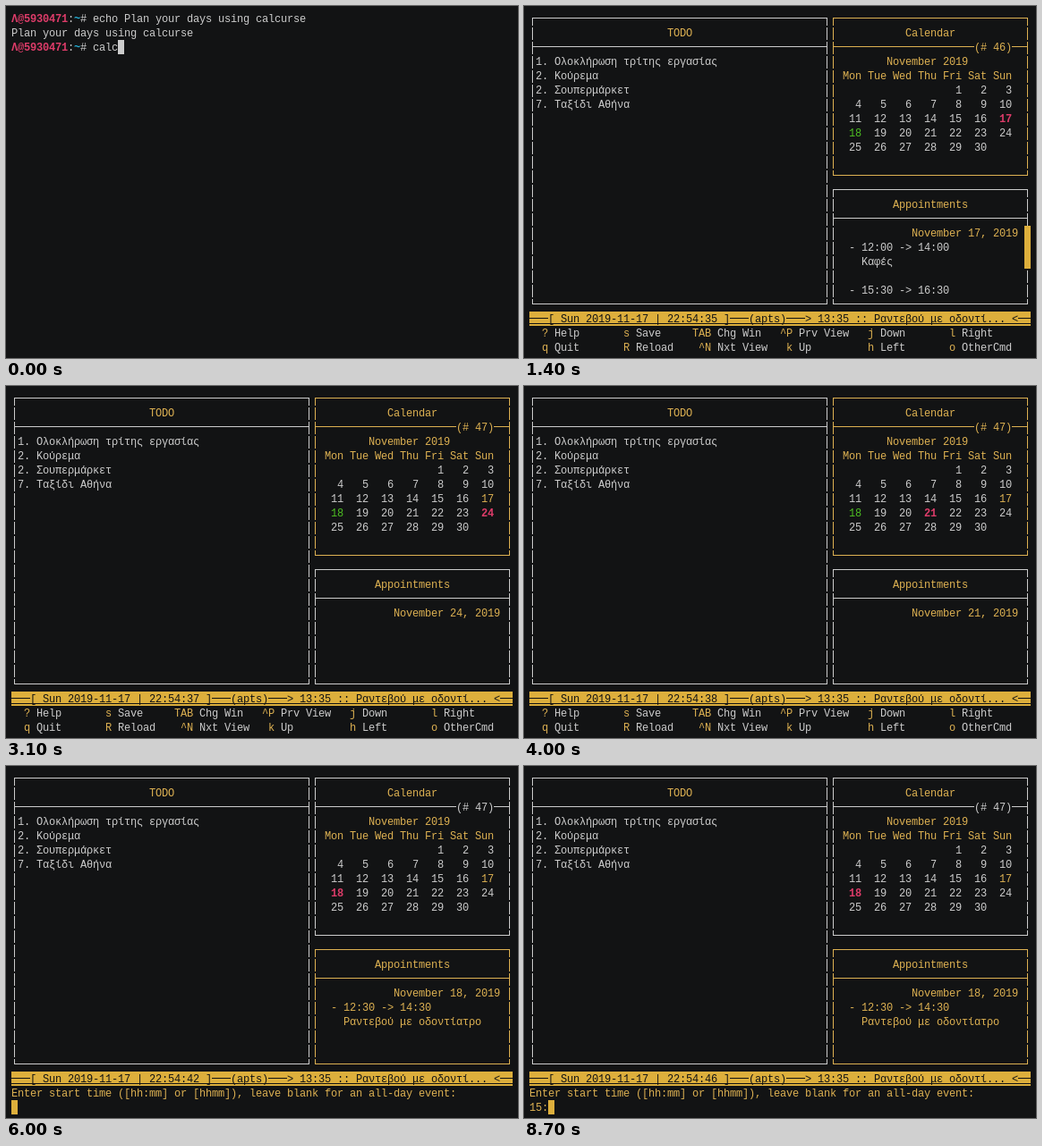
Write an HTML page with a canvas that moves like this. It is 572 px wide and 394 px high and loops after 9000 ms.

```html
<!DOCTYPE html>
<html lang="en">
<head>
<meta charset="utf-8">
<title>Terminal calendar</title>
<style>
html, body { margin: 0; width: 100%; height: 100%; overflow: hidden; background: #121314; }
canvas { display: block; }
</style>
</head>
<body>
<canvas id="screen" width="572" height="394"></canvas>
<script>
const ctx = document.getElementById('screen').getContext('2d');
const CELL_W = 7, CELL_H = 16, PAD = 6, LOOP = 9000;
const BG = '#121314', FG = '#cccccc', RED = '#dd3c69', GREEN = '#4ebf22', BLUE = '#26b0d7';
const GOLD = '#ddb152', GOLD_FILL = '#ddaf3c';

// Which arms each box character has: left, right, up, down
const BOX = { '─': 'lr', '│': 'ud', '┌': 'rd', '┐': 'ld', '└': 'ru', '┘': 'lu', '├': 'rud', '┤': 'lud' };

function fill(row, col, w, h, color) {
  ctx.fillStyle = color;
  ctx.fillRect(PAD + col * CELL_W, PAD + row * CELL_H, w * CELL_W, h * CELL_H);
}

function drawBox(x, y, arms) {
  const has = a => arms.includes(a);
  if (has('l')) ctx.fillRect(x, y + 7, 4, 1);
  if (has('r')) ctx.fillRect(x + 3, y + 7, 4, 1);
  if (has('u')) ctx.fillRect(x + 3, y + 2, 1, 6);
  if (has('d')) ctx.fillRect(x + 3, y + 7, 1, 9);
}

function put(row, col, text, color = FG, bold = false) {
  ctx.font = (bold ? 'bold ' : '') + '12px "Liberation Mono", monospace';
  ctx.fillStyle = color;
  [...text].forEach((ch, i) => {
    const x = PAD + (col + i) * CELL_W, y = PAD + row * CELL_H;
    if (BOX[ch]) drawBox(x, y, BOX[ch]);
    else if (ch !== ' ') ctx.fillText(ch, x, y + 12);
  });
}

function panel(row, col, w, h, title, titleCol, color) {
  const line = '─'.repeat(w - 2);
  put(row, col, '┌' + line + '┐', color);
  for (let r = row + 1; r < row + h - 1; r++) {
    put(r, col, '│', color);
    put(r, col + w - 1, '│', color);
  }
  put(row + 2, col, '├' + line + '┤', color);
  put(row + h - 1, col, '└' + line + '┘', color);
  put(row + 1, titleCol, title, GOLD);
}

// Number of times in the list already reached
const passed = (t, times) => times.filter(at => t >= at).length;

function prompt(row, command) {
  put(row, 0, 'Λ@5930471', RED, true);
  put(row, 9, ':');
  put(row, 10, '~', BLUE, true);
  put(row, 11, '# ' + command);
}

function shell(t) {
  const typed = t < 700 ? 'calc' : 'calcurse';
  prompt(0, 'echo Plan your days using calcurse');
  put(1, 0, 'Plan your days using calcurse');
  prompt(2, typed);
  fill(2, 13 + typed.length, 1, 1, FG);
}

function todo() {
  panel(0, 0, 48, 21, 'TODO', 22, FG);
  ['1. Ολοκλήρωση τρίτης εργασίας', '2. Κούρεμα', '2. Σουπερμάρκετ', '7. Ταξίδι Αθήνα']
    .forEach((item, i) => put(3 + i, 1, item));
}

function calendar(selected, color) {
  panel(0, 48, 32, 12, 'Calendar', 60, color);
  fill(2, 71, 6, 1, BG);
  put(2, 71, `(# ${selected > 17 ? 47 : 46})`, color);
  put(3, 57, 'November 2019', GOLD);
  put(4, 50, 'Mon Tue Wed Thu Fri Sat Sun', GOLD);
  for (let day = 1; day <= 30; day++) {
    const slot = day + 3, on = day === selected;
    const tint = on ? RED : day === 17 ? GOLD : day === 18 ? GREEN : FG;
    put(5 + Math.floor(slot / 7), 50 + slot % 7 * 4, String(day).padStart(3), tint, on);
  }
}

function appointments(selected, active) {
  const color = active ? GOLD : FG;
  panel(12, 48, 32, 9, 'Appointments', 58, color);
  put(15, 61, `November ${selected}, 2019`, GOLD);
  if (selected === 17) {
    put(16, 51, '- 12:00 -> 14:00', color);
    put(17, 53, 'Καφές', color);
    put(19, 51, '- 15:30 -> 16:30', color);
    fill(15, 79, 1, 3, GOLD_FILL);
  } else if (selected === 18) {
    put(16, 51, '- 12:30 -> 14:30', color);
    put(17, 53, 'Ραντεβού με οδοντίατρο', color);
  }
}

function statusBar(t) {
  const sec = 35 + passed(t, [2200, 2600, 3300, 4100, 4800, 5400, 5900, 6600, 7300, 8000, 8600]);
  fill(21, 0, 80, 1, GOLD_FILL);
  put(21, 0, `───[ Sun 2019-11-17 | 22:54:${sec} ]───(apts)───> 13:35 :: Ραντεβού με οδοντί... <──`, BG);
  ctx.fillRect(PAD, PAD + 21 * CELL_H + 13, 80 * CELL_W, 1);
}

const COMMON = ['? Help', 'q Quit', 's Save', 'R Reload', 'TAB Chg Win', '^N Nxt View', '^P Prv View'];
const CAL_KEYS = [...COMMON, 'k Up', 'j Down', 'h Left', 'l Right', 'o OtherCmd'];
const APT_KEYS = [...COMMON, 'a Add Item', 'd Del Item', 'e Edit Itm', 'v View', 'o OtherCmd'];

function help(keys) {
  keys.forEach((entry, i) => {
    const [key, ...label] = entry.split(' ');
    const row = 22 + i % 2, col = Math.floor(i / 2) * 13;
    put(row, col, key.padStart(3), GOLD);
    put(row, col + 4, label.join(' '));
  });
}

function input(t) {
  const typed = '15:'.slice(0, passed(t, [7500, 7800, 8400]));
  put(22, 0, 'Enter start time ([hh:mm] or [hhmm]), leave blank for an all-day event:', GOLD);
  put(23, 0, typed, GOLD);
  fill(23, typed.length, 1, 1, GOLD_FILL);
}

function planner(t) {
  const selected = t < 3100 ? 17 : 24 - passed(t, [3500, 3700, 4000, 4200, 4400, 4500]);
  const inApts = t >= 5400;
  todo();
  calendar(selected, inApts ? FG : GOLD);
  appointments(selected, inApts);
  statusBar(t);
  if (t >= 5900) input(t);
  else help(inApts ? APT_KEYS : CAL_KEYS);
}

function frame(now) {
  const t = now % LOOP;
  ctx.fillStyle = BG;
  ctx.fillRect(0, 0, 572, 394);
  if (t < 1000) shell(t);
  else if (t >= 1400) planner(t);
  requestAnimationFrame(frame);
}
frame(0);
</script>
</body>
</html>
```
